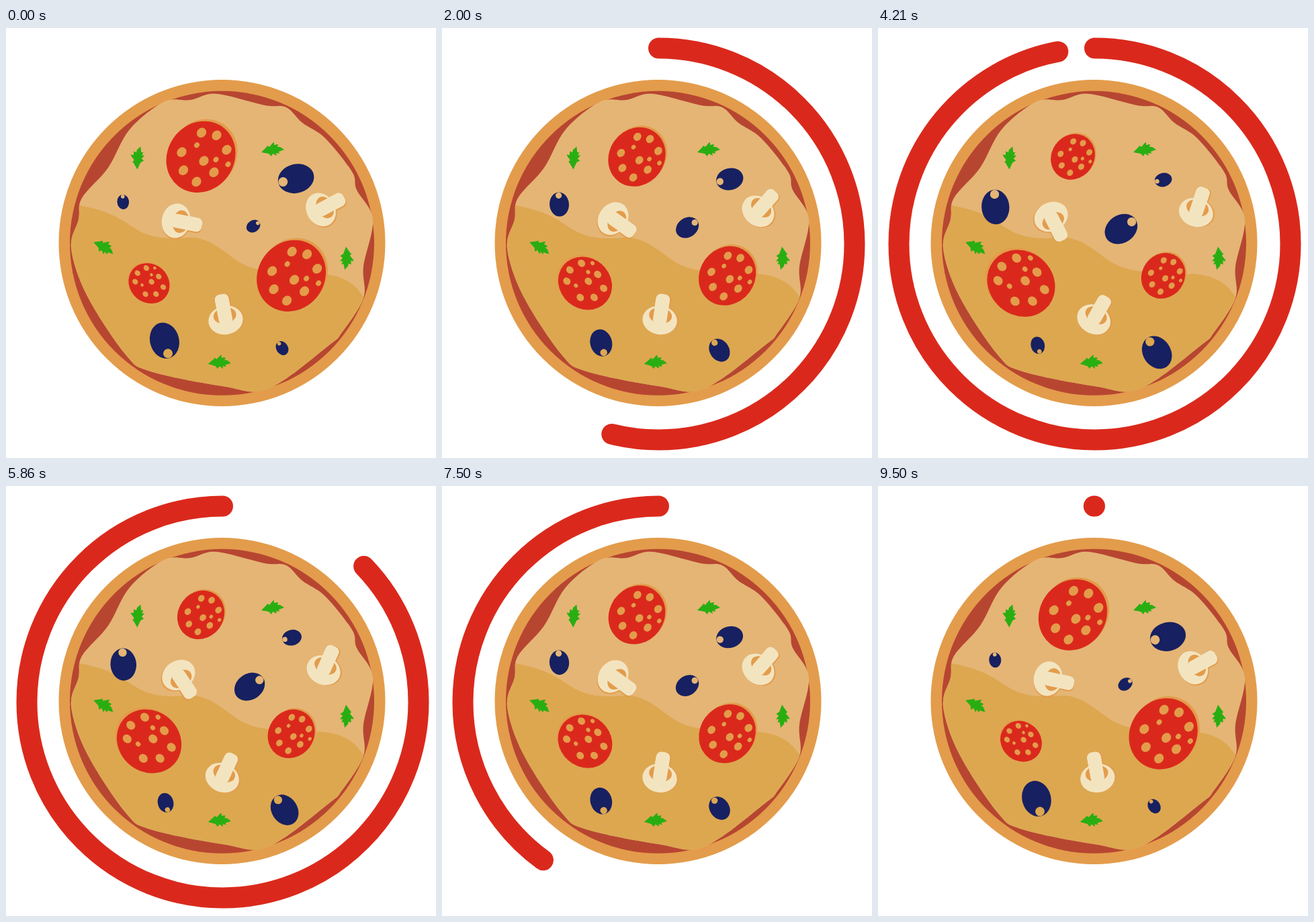
Write an HTML page that moves like this. It is 640 by 640 pixels and loops after 9.57 s.

```html
<!DOCTYPE html>
<html lang="en">
<head>
<meta charset="utf-8">
<title>Pizza timer</title>
<style>
  html, body { margin: 0; width: 100%; height: 100%; overflow: hidden; background: #fff; }
  svg { display: block; width: 100vw; height: 100vh; }
</style>
</head>
<body>
<svg viewBox="0 0 640 640">
  <defs>
    <clipPath id="cheeseClip"><path id="cheese"/></clipPath>
    <ellipse id="slice" rx="49.5" ry="55" transform="rotate(36)"/>
    <g id="mushroom">
      <ellipse cy="8.5" rx="25.8" ry="21.3"/>
      <rect x="-10.3" y="-30.5" width="20.6" height="46" rx="7.5"/>
    </g>
  </defs>
  <circle cx="321.5" cy="320" r="243" fill="#e39c4b"/>
  <circle cx="321.5" cy="320.3" r="226.5" fill="#b74631"/>
  <g clip-path="url(#cheeseClip)">
    <rect width="640" height="640" fill="#e5b575"/>
    <path fill="#dda750" d="M90 262L110 264C150 272 165 280 190 297S240 314 270 312S320 330 345 347S420 367 470 366C500 368 520 380 533 402L560 560H80Z"/>
  </g>
  <g id="toppings"></g>
  <circle id="ring" cx="322.5" cy="321.5" r="291.5" pathLength="360" fill="none" stroke="#da291c"
    stroke-width="31" stroke-linecap="round" transform="rotate(-90 322.5 321.5)"/>
</svg>
<script>
const LOOP = 9570, HALF = LOOP / 2, FPS = 14;
const TAN = '#e39c4b', RED = '#da291c', CREAM = '#f3e4c0', LIGHT = '#e5b575', DARK = '#dda750';
const ring = document.getElementById('ring');
const toppings = document.getElementById('toppings');
const mix = (a, b, u) => a + (b - a) * u;

// Closed Catmull-Rom curve through the given points.
function smoothPath(points) {
  const at = i => points[(i + points.length) % points.length];
  const handle = (i, side) => at(i).map((v, k) => v + side * (at(i + 1)[k] - at(i - 1)[k]) / 6);
  return `M${points[0]}` + points.map((_, i) => `C${handle(i, 1)} ${handle(i + 1, -1)} ${at(i + 1)}`).join('') + 'Z';
}
document.getElementById('cheese').setAttribute('d', smoothPath([
  [313, 98], [385, 115], [417, 118], [441, 141], [475, 164], [515, 214], [522, 241], [546, 285],
  [532, 355], [532, 402], [500, 453], [481, 472], [390, 537], [322, 533], [215, 511], [178, 486],
  [121, 399], [97, 328], [108, 285], [113, 253], [152, 208], [184, 151], [235, 110], [275, 107]
]));

// A topping swings from one angle and scale to the other and back.
const movers = [];
function add(markup, x, y, angles, scales) {
  const node = document.createElementNS('http://www.w3.org/2000/svg', 'g');
  node.innerHTML = markup;
  toppings.append(node);
  movers.push(swing => node.setAttribute('transform',
    `translate(${x} ${y}) rotate(${mix(...angles, swing)}) scale(${mix(...scales, swing)})`));
}

const leaf = (x, y, angle) => add(
  '<path fill="#29ae12" d="M-17 4L-9-4-8-6-5-4 0-10 2-11 2-7 8-8 7-4 11-4 17 0 9 3 10 6 5 5 6 9 0 6-2 10-6 6Z"/>',
  x, y, [angle, angle], [1, 1]);

const spots = (radius, points) => points.map(([x, y]) =>
  `<ellipse rx="${radius * .93}" ry="${radius * 1.07}" transform="translate(${x} ${y}) rotate(40)" fill="${TAN}"/>`).join('');
const slice = `<use href="#slice" x="3" y="-3" fill="${TAN}"/><use href="#slice" fill="${RED}"/>`
  + spots(7.2, [[1, -36], [23.5, -32], [38.5, -10.5], [19.5, 23], [-6.5, 37], [-26, 20], [-28.5, -7], [4.5, 6]])
  + spots(4, [[-6, -17.5], [22.5, 4], [40.5, 11]]);
const pepperoni = (x, y, angle, scales) => add(slice, x, y, [angle, angle], scales);

// Olives scale about a point near the hole.
const olive = (x, y, angle, hole, scales) => add(
  `<ellipse cx="13.7" rx="26.8" ry="21.4" fill="#172060"/><circle cx="-6" r="6.9" fill="${hole}"/>`,
  x, y, [angle, angle], scales);

const mushroom = (x, y, ...angles) => add(
  `<use href="#mushroom" x="2.2" y="-.5" fill="${TAN}"/><use href="#mushroom" fill="${CREAM}"/>
   <ellipse cy="1.5" rx="17" ry="12" fill="${TAN}"/>
   <rect x="-10.3" y="-30.5" width="20.6" height="46" rx="7.5" fill="${CREAM}"/>`,
  x, y, angles, [1, 1]);

leaf(196, 193, -75);
leaf(397, 181, 0);
leaf(507, 343, 100);
leaf(146, 326, 38);
leaf(318, 497.5, 5);

const shrink = [1, .59], grow = [.58, 1.01];
pepperoni(290, 191.8, 0, shrink);
pepperoni(424.6, 368.8, 0, shrink);
pepperoni(213, 380, -85, grow);

const oliveShrink = [1.01, .41], oliveGrow = [.41, 1.04];
olive(418.2, 227.5, -14, LIGHT, oliveShrink);
olive(173.9, 253.3, 86, LIGHT, oliveGrow);
olive(372.8, 291.8, 146, LIGHT, oliveGrow);
olive(239.5, 478.6, -105, DARK, oliveShrink);
olive(407.9, 471.8, 57, DARK, oliveGrow);

mushroom(261.5, 288.5, 101, 160);
mushroom(476.1, 266.4, 62, 13);
mushroom(325.4, 426.4, -10.6, 35);

// Cubic bezier (1/6, 1/6, 2/3, 1): steady start, soft stop.
function softStop(u) {
  let s = u;
  for (let i = 0; i < 6; i++) s -= (.5 * s + s * s - .5 * s ** 3 - u) / (.5 + 2 * s - 1.5 * s * s);
  return .5 * s + 2 * s * s - 1.5 * s ** 3;
}
const easeInOut = u => u * u * (3 - 2 * u);

function render(t) {
  const growing = t < HALF;
  const u = growing ? t / HALF : t / HALF - 1;
  for (const move of movers) move(growing ? u : 1 - u);

  const start = growing ? 0 : 360 * easeInOut(u);
  const end = growing ? 360 * softStop(u) : 360;
  ring.style.display = end > start ? '' : 'none';
  ring.setAttribute('stroke-dasharray', `${end - start} 720`);
  ring.setAttribute('stroke-dashoffset', -start);
}

const begin = performance.now();
function tick() {
  const elapsed = (performance.now() - begin) % LOOP;
  const step = Math.floor(elapsed * FPS / 1000 + .1);
  render(step * 1000 / FPS % LOOP);
  requestAnimationFrame(tick);
}
tick();
</script>
</body>
</html>
```
